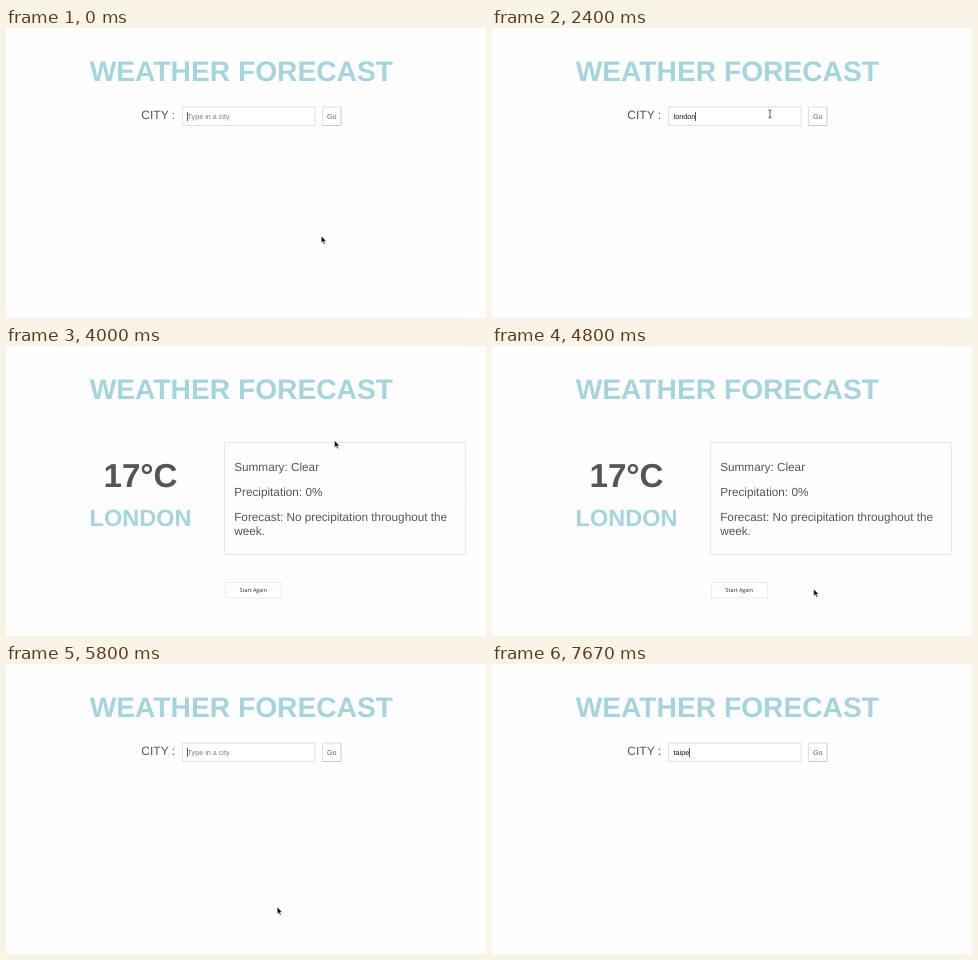
An HTML page that plays this animation: 480 px wide and 290 px high, repeating every 8000 ms.

```html
<!DOCTYPE html>
<html lang="en">
<head>
<meta charset="utf-8">
<title>Weather forecast</title>
<style>
  html, body { margin: 0; width: 100%; height: 100%; overflow: hidden; background: #fefefe; }
  svg { display: block; width: 100%; height: 100%; }
  text { font-family: "Liberation Sans", Arial, sans-serif; fill: #555; text-rendering: geometricPrecision; }
  .title, .town { font-weight: bold; fill: #a6d4de; }
  .title { font-size: 28.2px; }
  .town { font-size: 23.5px; }
  .temp { font-weight: bold; font-size: 33.2px; }
  .label { font-size: 12px; }
  .small { font-size: 7.2px; }
  .info { font-size: 11.75px; }
  .again { font: 5.4px "Open Sans", "Noto Sans", sans-serif; fill: #222; }
  .mid { text-anchor: middle; }
  .line { fill: none; stroke-width: 1; }
</style>
</head>
<body>
<svg viewBox="0 0 480 290">
  <rect width="480" height="290" fill="#fefefe"/>
  <text class="title" x="83.7" y="52.6">WEATHER FORECAST</text>

  <g id="form">
    <text class="label" x="135.3" y="90.8">CITY :</text>
    <rect x="176.5" y="79" width="132.5" height="18.5" fill="#fff" stroke="#e0e0e0"/>
    <text id="entry" class="small" x="181.6" y="91"></text>
    <rect id="caret" y="84" width=".8" height="9" fill="#333"/>
    <rect id="goFace" x="316.5" y="79" width="18.5" height="18.5"/>
    <path id="goLight" class="line" d="M316.5 97.5V79H335"/>
    <path id="goDark" class="line" d="M335 79V97.5H316.5"/>
    <text id="goText" class="small mid" x="325.8" y="91">Go</text>
  </g>

  <g id="result">
    <text class="temp mid" x="134.5" y="141">17°C</text>
    <text class="town mid" x="134.5" y="180">LONDON</text>
    <rect class="line" x="218.5" y="96.5" width="241" height="112" stroke="#dedede" stroke-dasharray="1.5 .7"/>
    <text class="info" x="228.2" y="124.5">Summary: Clear</text>
    <text class="info" x="228.2" y="149.5">Precipitation: 0%</text>
    <text class="info" x="228.2" y="175">Forecast: No precipitation throughout the</text>
    <text class="info" x="228.2" y="188.5">week.</text>
    <rect id="againIdle" class="line" x="219.5" y="236.5" width="56" height="15.5" stroke="#ececec"/>
    <path id="againDown" class="line" d="M219.5 252V236.5H276" stroke="#999"/>
    <text class="again mid" x="247.3" y="246.3">Start Again</text>
  </g>

  <path id="arrow" d="M0 0V7L1.6 5.6L2.7 8.2L3.9 7.7L2.8 5.2H5Z" fill="#111" stroke="#fff" stroke-width=".4"/>
  <path id="beam" d="M-1.6 -4Q0 -4 0 -3Q0 -4 1.6 -4M0 -3V3M-1.6 4Q0 4 0 3Q0 4 1.6 4" fill="none" stroke="#333" stroke-width=".8"/>
</svg>
<script>
const LOOP = 8000, STEP = 200 / 3, BLINK = 500;
const PRESS_GO = 2930, SHOW = 3065, PRESS_AGAIN = 5665, RESET = 5800;

const $ = id => document.getElementById(id);
const show = (id, on) => $(id).setAttribute("visibility", on ? "inherit" : "hidden");
const set = (id, attrs) => {
  for (const key in attrs) $(id).setAttribute(key, attrs[key]);
};
const ease = k => k * k * (3 - 2 * k);

// each move starts where the previous one ended; bend bows it to the right
const home = { x: 315.3, y: 208 };
const moves = [
  { from: 0, to: 467, x: 275, y: 85.5 },
  { from: 2333, to: 2800, x: 328, y: 94 },
  { from: 3980, to: 4533, x: 324, y: 243, bend: 48 },
  { from: 4733, to: 5267, x: 271.2, y: 243 },
  { from: 5933, to: 6467, x: 230, y: 91 }
];

// one typing session per visit to the form; pace is the first key gap in ms
const london = { word: "london", focus: -134, start: 1200, pace: 210 };
const taipei = { word: "taipe", focus: 5466, start: 6933, pace: 220 };
const keyTime = (s, i) => s.start + i * (s.pace - 10 * i);

function pointerAt(t) {
  let { x, y } = home;
  for (const m of moves) {
    if (t <= m.from) break;
    const k = ease(Math.min(1, (t - m.from) / (m.to - m.from)));
    x += (m.x - x) * k + (m.bend || 0) * Math.sin(Math.PI * k);
    y += (m.y - y) * k;
  }
  return { x, y };
}

function drawField(t) {
  const session = t < RESET - 5 ? london : taipei;
  let count = 0, last = session.focus;
  while (count < session.word.length && t >= keyTime(session, count) - 1) {
    last = keyTime(session, count++);
  }
  const entry = $("entry");
  entry.textContent = session.word.slice(0, count) || "Type in a city";
  entry.style.fill = count ? "#111" : "#777";
  set("caret", { x: count ? 181.6 + entry.getComputedTextLength() : 181 });
  show("caret", (t - last) % (2 * BLINK) < BLINK);
}

function drawGo(hover, down) {
  set("goFace", { fill: hover ? "#a6d4de" : "#fdfdfd" });
  set("goLight", { stroke: down ? "#8a9a9e" : "#e0e0e0" });
  set("goDark", { stroke: down ? "#c3d9de" : "#cacaca" });
  $("goText").style.fill = hover ? "#fff" : "#666";
}

function drawPointer({ x, y }, hidden, text) {
  show("arrow", !hidden && !text);
  show("beam", !hidden && text);
  for (const id of ["arrow", "beam"]) set(id, { transform: `translate(${x} ${y})` });
}

function draw(time) {
  // the picture advances at 15 steps per second
  const t = Math.floor((time + 5) / STEP) * STEP;
  const onResult = t >= SHOW && t < RESET - 5;
  const p = pointerAt(t);
  const inRow = !onResult && p.y > 79 && p.y < 98;

  show("form", !onResult);
  show("result", onResult);
  if (onResult) {
    show("caret", false);
    show("againIdle", t < PRESS_AGAIN);
    show("againDown", t >= PRESS_AGAIN);
  } else {
    show("againIdle", false);
    show("againDown", false);
    drawField(t);
    drawGo(inRow && p.x > 316 && p.x < 336, t >= PRESS_GO && t < SHOW);
  }

  // typing hides the pointer until it moves again
  const hidden = t >= london.start - 1 && t <= moves[1].from + 1 || t >= taipei.start - 1;
  drawPointer(p, hidden, inRow && p.x > 176 && p.x < 309);
}

const start = performance.now();
function tick() {
  draw((performance.now() - start) % LOOP);
  requestAnimationFrame(tick);
}
tick();
</script>
</body>
</html>
```
